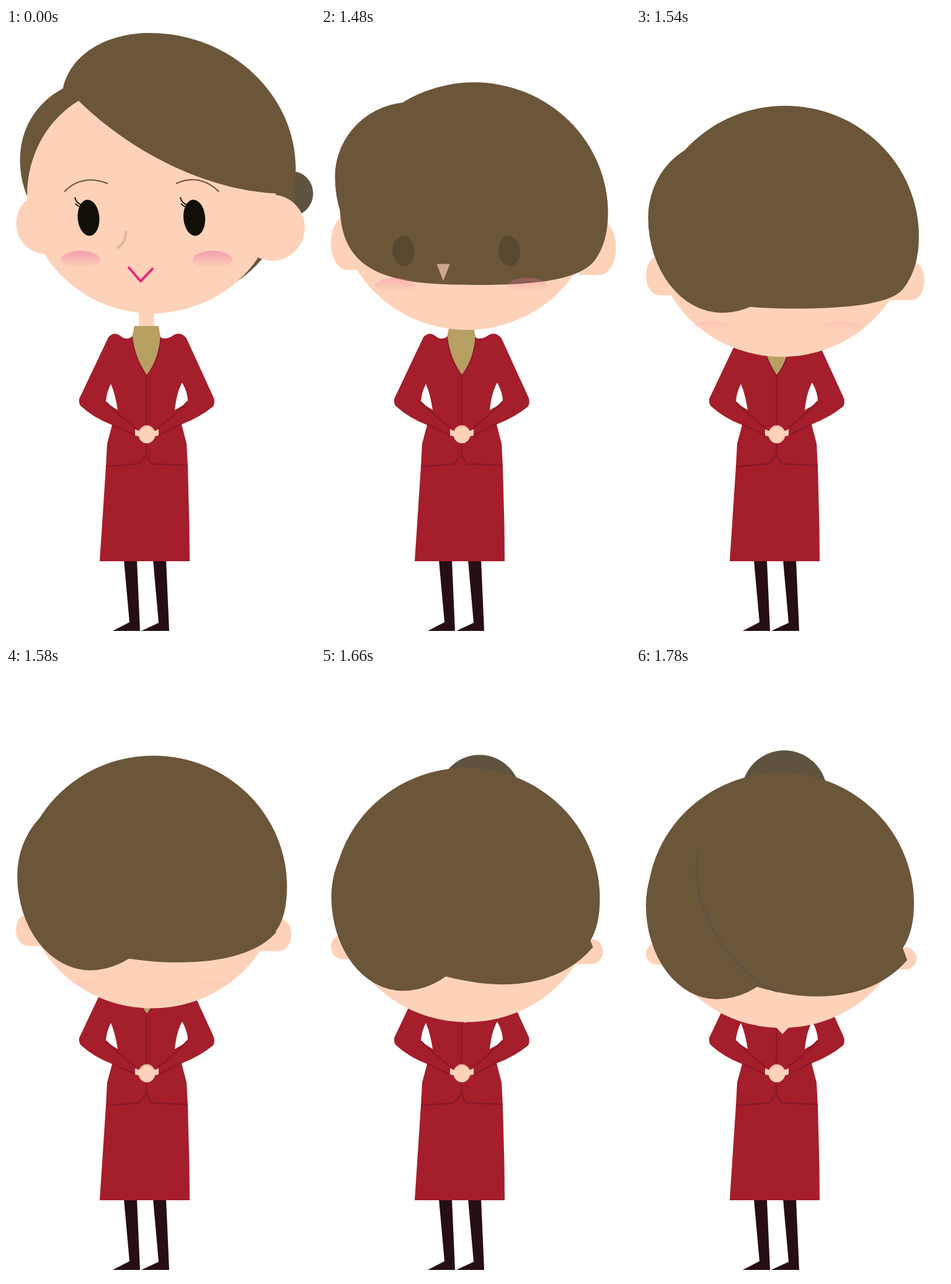
These frames come from a looping animation (498 px wide and 982 px high, 4240 ms). An HTML page with a canvas:

```html
<!DOCTYPE html>
<html>
<head>
<meta charset="utf-8">
<style>
html, body { margin: 0; width: 100%; height: 100%; overflow: hidden; background: #fff; }
canvas { display: block; }
</style>
</head>
<body>
<canvas id="stage" width="498" height="982"></canvas>
<script>
const ctx = document.getElementById('stage').getContext('2d');
const LOOP = 4240, BOW_START = 1420, BOW_TIME = 360, STEP = 20;
const SKIN = '#fed2b9', HAIR = '#6b563a', BUN = '#5f5340', RED = '#a51e2b',
      SEAM = '#8a172a', GOLD = '#b79f62', DARK = '#260e12', INK = '#120f08';

function fill(color, d) {
  ctx.fillStyle = color;
  ctx.fill(new Path2D(d));
}

function line(color, width, d) {
  ctx.strokeStyle = color;
  ctx.lineWidth = width;
  ctx.stroke(new Path2D(d));
}

function oval(color, x, y, rx, ry, turn = 0) {
  ctx.fillStyle = color;
  ctx.beginPath();
  ctx.ellipse(x, y, rx, ry, turn, 0, 7);
  ctx.fill();
}

// The standard "ease" curve: cubic-bezier(.25, .1, .25, 1)
function ease(x) {
  let lo = 0, hi = 1, u;
  for (let i = 0; i < 30; i++) {
    u = (lo + hi) / 2;
    if (.75 * u * (1 - u) + u ** 3 < x) lo = u; else hi = u;
  }
  return .3 * u * (1 - u) ** 2 + 3 * u * u * (1 - u) + u ** 3;
}

function cheeks(top, height, alpha) {
  const g = ctx.createLinearGradient(0, top, 0, top + height);
  g.addColorStop(0, 'rgba(236,120,165,.58)');
  g.addColorStop(.92, 'rgba(236,120,165,0)');
  ctx.globalAlpha = alpha;
  for (const x of [120, 332.5]) oval(g, x, top + height / 2, 32, height / 2);
  ctx.globalAlpha = 1;
}

function eyes(y, ry) {
  for (const x of [133, 303.5]) oval(INK, x, y, 17.5, ry, -.08);
}

function lashes(x, y) {
  line(INK, 1.8, `M${x} ${y}q2 9 10 12M${x + 1} ${y + 10}q3 5 9 5`);
}

function body() {
  fill(DARK, 'M190 855H211L216 969H172L199 955ZM237 855H258L263 969H218L246 956Z');
  fill(SKIN, 'M214 440H239V482H214Z');
  fill(RED, `M204 496Q196 502 187 497Q175 486 165 497L118 596Q117 604 121 608
    Q142 627 171 638L163 668L161 705L151 857H296L295.5 800L293 705L291 668L283 637
    Q312 626 334 608Q337 602 335 595L291 499Q281 486 268 495Q259 501 249 498Z`);
  fill('#fff', `M169 572Q162 586 161 600L164 604L180 614Q176 588 169 572Z
    M284 570Q293 586 293 600L290 604L272 614Q275 585 284 570Z`);
  line(SEAM, 2.4, `M161 601Q180 621 209 643M171 637L209 655M293 600Q274 621 245 643M283 636L245 655
    M226.5 558V686M161 705L214 700.5L226.5 686L234 700.5L293 703`);
  fill(GOLD, 'M207 479H246L249 497Q246 533 227 558Q207 531 203 497Z');
  line(SEAM, 1.8, 'M203 496Q207 531 227 559Q247 533 249.5 497');
  fill(SKIN, 'M208 645L218 649V657L208 655ZM246 645L236 649V657L246 655Z');
  oval(SKIN, 227, 653, 13.5, 14.5);
  line('#e8b5a0', 1.3, 'M215 648Q219 640 227 640Q235 640 239 648');
}

function standingHead() {
  oval(BUN, 460, 266, 35, 36);
  fill(HAIR, `M92 96C105 40 165 8 231 8C365 8 467 110 467 225L463 285Q435 360 412 372
    Q393 394 370 409L200 400L34 270C10 210 22 135 92 97Z`);
  oval(SKIN, 64, 314, 47.5, 49);
  oval(SKIN, 429, 321, 52.5, 53);
  fill(SKIN, `M117 117C70 145 34 200 34 270A203 195 0 0 0 235 459
    A205 195 0 0 0 405 371L435 266C320 260 200 198 117 117Z`);
  cheeks(358, 30, 1);
  eyes(305, 29);
  lashes(111, 272);
  lashes(281, 272);
  line(HAIR, 2, 'M94 263Q123 234 164 250M274 250Q312 233 343 263');
  line('#e2b59d', 4, 'M193 326Q194 344 179 354');
  line('#ee2a7b', 4, 'M197 384L217 407L237 386');
}

function bowingHead(p) {
  const mix = (a, b) => a + (b - a) * p;
  const stops = [0, .19, .559, .847, .968, 1];
  const key = (...v) => {
    let i = 0;
    while (i < 4 && p > stops[i + 1]) i++;
    return v[i] + (v[i + 1] - v[i]) * (p - stops[i]) / (stops[i + 1] - stops[i]);
  };

  // Flat towards the face, round outside; side is 1 for left, -1 for right
  const ear = (x, bottom, h, side) => {
    const r = mix(27, 17), inner = x + side * 60, outer = x + side * r;
    fill(SKIN, `M${inner} ${bottom}H${outer}A${r} ${h / 2} 0 0 ${side > 0 ? 1 : 0} ${outer} ${bottom - h}H${inner}Z`);
  };
  ear(16, mix(368, 478), mix(100, 34), 1);
  ear(mix(481, 452), mix(376, 486), mix(100, 35), -1);

  const bun = mix(38, 69);
  oval(BUN, mix(450, 239), mix(265, 203), bun, bun);
  oval(SKIN, 235, mix(268, 385), 205, 195);

  // Side lock
  const lx = mix(150, 130), ly = mix(205, 383), lr = lx - mix(24, 16), low = mix(361, 534) - ly;
  ctx.fillStyle = HAIR;
  ctx.beginPath();
  ctx.ellipse(lx, ly, lr, mix(117, 132), 0, Math.PI, 2 * Math.PI);
  ctx.ellipse(lx, ly, 131, low, 0, 0, Math.PI / 2);
  ctx.ellipse(lx, ly, lr, low, 0, Math.PI / 2, Math.PI);
  ctx.fill();

  // Crown and fringe
  const cx = mix(250, 233), cy = mix(278, 380), rx = mix(216, 215);
  const bottom = key(394, 413, 451, 491, 522, 529.5);
  ctx.beginPath();
  ctx.ellipse(cx, cy, rx, 210, 0, Math.PI, 2 * Math.PI);
  ctx.quadraticCurveTo(cx + rx, key(325, 346, 388, 410, 418, 425),
    key(440, 440, 430, 438, 432, 430), key(360, 375, 420, 428, 447, 452));
  ctx.lineTo(key(440, 440, 430, 439, 438, 437), key(360, 375, 420, 431, 462, 471));
  ctx.bezierCurveTo(key(420, 415, 412, 405, 405, 405), key(386, 404, 441, 469, 501, 508),
    mix(350, 358), bottom, key(250, 250, 255, 290, 292, 290), bottom);
  ctx.bezierCurveTo(key(130, 130, 140, 215, 208, 200), bottom,
    key(40, 37, 30, 40, 40, 40), cy + key(106, 106, 100, 90, 90, 90), cx - rx, cy);
  ctx.fill();

  // Tufts vanish right after the start
  const tuft = 1 - p / .08;
  if (tuft > 0) fill(HAIR, `M222 73L238 ${70 - 10 * tuft}L265 71ZM403 131L${415 + 6 * tuft} ${143 - 4 * tuft}L429 163Z`);
  if (p === 1) line(BUN, 4, 'M102 292C85 345 113 440 195 505Q208 515 228 521');

  ctx.globalAlpha = Math.max(0, .79 - 3.1 * p);
  eyes(mix(314.5, 546), mix(28, 8));
  ctx.globalAlpha = 1;
  if (p < .05) lashes(281, 277);
  cheeks(mix(366, 555), mix(29, 4), Math.max(0, .78 - .85 * p));

  ctx.globalAlpha = Math.min(1, .53 + .65 * p);
  fill(SKIN, `M${mix(179, 219)} ${mix(334, 572)}H${mix(197, 253)}L${mix(188, 236)} ${mix(364, 590)}Z`);
  ctx.globalAlpha = 1;
}

function draw(now) {
  const t = Math.floor(now % LOOP / STEP) * STEP;
  ctx.fillStyle = '#fff';
  ctx.fillRect(0, 0, 498, 982);
  body();
  if (t < BOW_START + STEP) {
    standingHead();
  } else {
    const x = (t - BOW_START) / BOW_TIME, first = ease(STEP / BOW_TIME);
    bowingHead(x >= 1 ? 1 : (ease(x) - first) / (1 - first));
  }
}

const start = performance.now();
function frame() {
  draw(performance.now() - start);
  requestAnimationFrame(frame);
}
frame();
</script>
</body>
</html>
```
